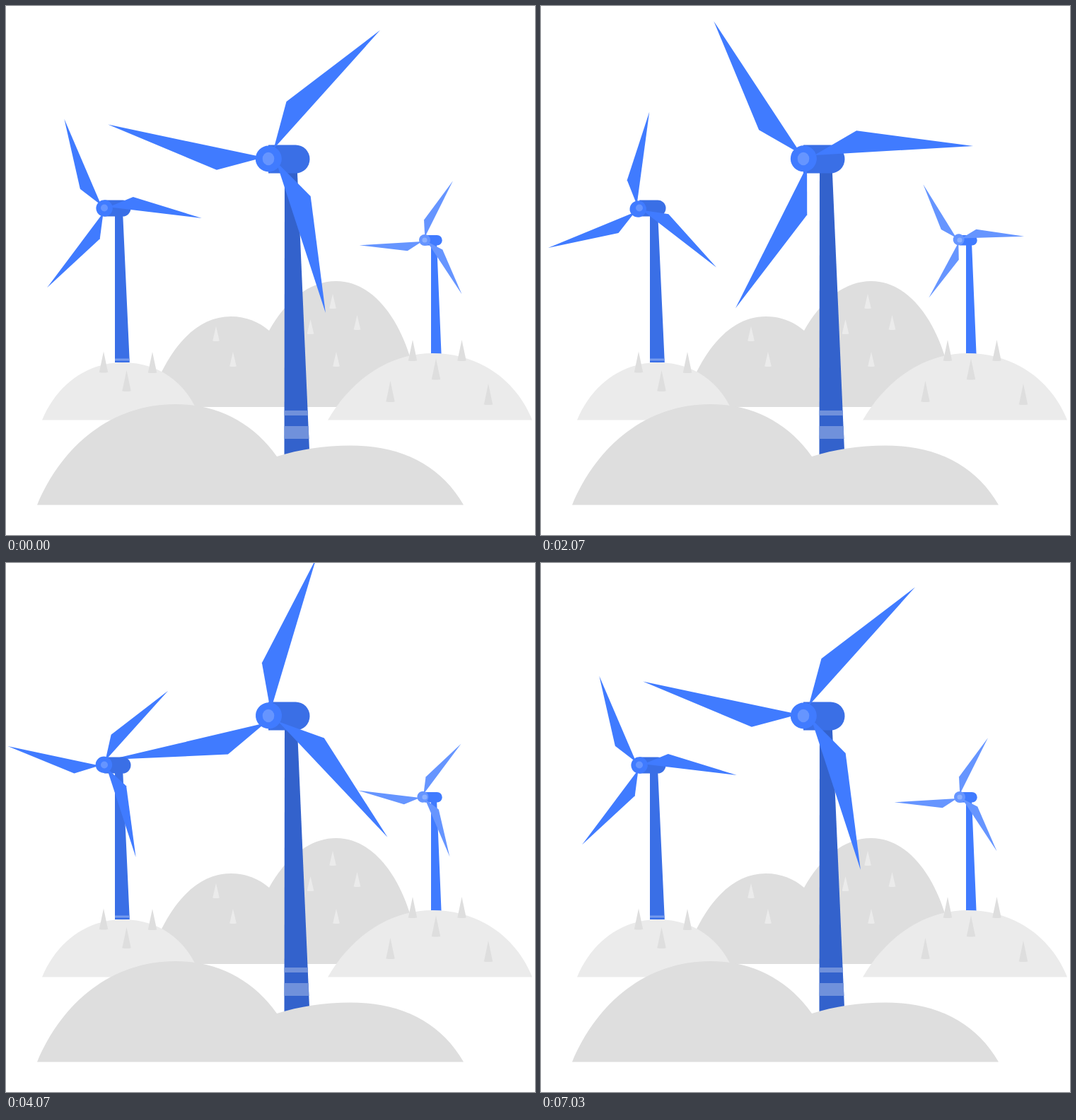
Recreate the animation shown at these times as an HTML page. Size 748 by 748 pixels, loop 7060 ms.

```html
<!DOCTYPE html>
<html lang="en">
<head>
<meta charset="utf-8">
<title>Wind turbines</title>
<style>
  html, body { margin: 0; height: 100%; overflow: hidden; background: #fff; }
  svg { display: block; width: 100vw; height: 100vh; }
</style>
</head>
<body>
<svg viewBox="0 0 748 748">
  <path fill="#dedede" d="M200 567C225 490 265 439 318 439C340 439 358 447 372 459C395 418 428 389 467 389C515 389 552 435 571 495L590 567Z"/>
  <g id="farTrees" fill="#ebebeb"></g>

  <!-- large turbine -->
  <path fill="#3362cc" d="M394 230H411.7L429.5 640H393.5Z"/>
  <path fill="#7091db" d="M393.6 572H426.8L427.1 579H393.6ZM393.5 594H427.7L428.5 612H393.5Z"/>
  <path fill="#3a6fe6" d="M371 196.5H409.5a20 20 0 0 1 0 40H371Z"/>
  <g id="large" fill="#407bff"></g>
  <ellipse cx="371" cy="216" rx="8.3" ry="9.3" fill="#6695ff"/>

  <!-- left turbine -->
  <path fill="#3a6fe6" d="M154 290H165L174.8 504H154ZM139 274.5H165a11.5 11.5 0 0 1 0 23H139Z"/>
  <path fill="#759aed" d="M154 498.5H174.5V501.5H154Z"/>
  <g id="left" fill="#407bff"></g>
  <circle cx="139" cy="285.5" r="5" fill="#6695ff"/>

  <!-- right turbine -->
  <path fill="#407bff" d="M601 334H609L615.6 493H601ZM592 324H609.5a7 7 0 0 1 0 14.5H592Z"/>
  <g id="right" fill="#6695ff"></g>
  <circle cx="592" cy="331" r="3.6" fill="#8cb0ff"/>

  <path fill="#ebebeb" d="M51 585.5C72 535 115 504 165 504C212 504 248 528 267 566L278 585.5Z"/>
  <path fill="#ebebeb" d="M455 585.5C490 525 545 491 603 491C670 491 722 530 744 585.5Z"/>
  <g id="nearTrees" fill="#dedede"></g>
  <path fill="#dedede" d="M44 705.5C80 620 150 563 240 563C300 563 350 590 383 637C415 627 450 621.5 487 621.5C560 621.5 615 650 647 705.5Z"/>
</svg>
<script>
const LOOP = 7060, FPS = 30;
const byId = id => document.getElementById(id);

function plant(id, halfWidth, height, spots) {
  byId(id).innerHTML = spots.map(([x, y]) =>
    `<path d="M${x} ${y}L${x + halfWidth} ${y + height}Q${x} ${y + height + 1} ${x - halfWidth} ${y + height}Z"/>`
  ).join('');
}
plant('farTrees', 4.8, 20.5, [[297, 453], [321, 489], [430.5, 443], [462, 407], [496.5, 437], [467, 489]]);
plant('nearTrees', 6.2, 29.5, [[138, 488.5], [207, 489], [170.5, 515], [575, 472], [644.5, 472],
  [608, 498.5], [543.5, 530], [682, 534]]);

// pivot: centre of rotation; hub: where the blades meet, slightly off the pivot
const rotors = [
  { id: 'large', pivot: [371.5, 216], hub: [375, 212], cap: [371.3, 216], capR: 18.5,
    length: 235, elbow: [72, -34], start: -49.1, turns: 3, frames: 209 },
  { id: 'left', pivot: [138, 286.3], hub: [139.1, 286], cap: [139.1, 286], capR: 11.7,
    length: 138.4, elbow: [38.8, -20.1], start: 5.8, turns: 2, frames: 210 },
  { id: 'right', pivot: [590.6, 331.8], hub: [592, 331], cap: [592, 331], capR: 8,
    length: 92.7, elbow: [25.4, -13.2], start: -64.5, turns: 4, frames: 210 }
];

for (const r of rotors) {
  const k = r.length / 235;
  const blade = `M${r.length} 0L${r.elbow}L${10 * k} ${-4 * k}Z`;
  r.node = byId(r.id);
  r.node.innerHTML = [0, 120, 240].map(a =>
    `<path transform="translate(${r.hub}) rotate(${r.start + a})" d="${blade}"/>`
  ).join('') + `<circle cx="${r.cap[0]}" cy="${r.cap[1]}" r="${r.capR}"/>`;
}

function draw() {
  // steps fall on whole hundredths of a second, up to a few ms before the exact 1/30 s
  const frame = Math.floor(performance.now() % LOOP * FPS / 1000 + 0.25);
  for (const r of rotors) {
    const p = Math.min(1, Math.max(0, (frame - 1) / r.frames));
    r.node.setAttribute('transform', `rotate(${-360 * r.turns * p} ${r.pivot})`);
  }
  requestAnimationFrame(draw);
}
draw();
</script>
</body>
</html>
```
